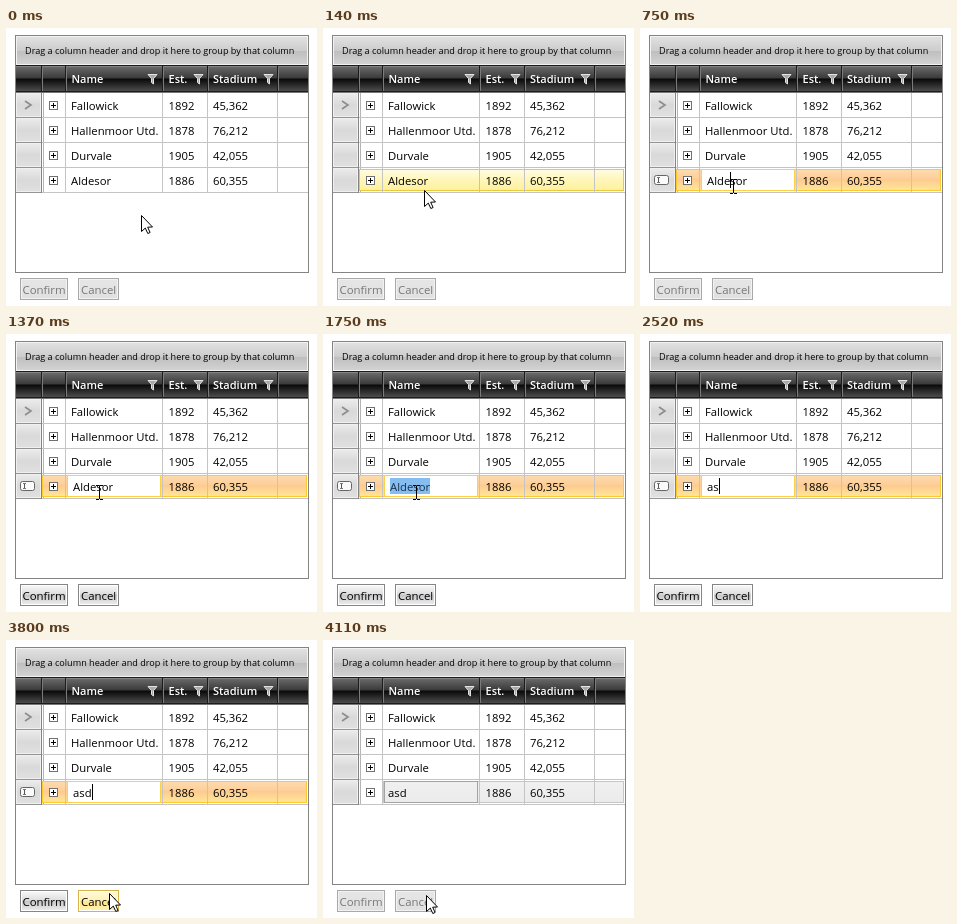
An HTML page with a canvas for the animation above (5160 ms loop, 311 by 278 pixels).

```html
<!DOCTYPE html>
<html lang="en">
<head>
<meta charset="utf-8">
<title>Grid row editing</title>
<style>
html, body { margin: 0; width: 100%; height: 100%; overflow: hidden; background: #fff; }
canvas { display: block; }
</style>
</head>
<body>
<canvas id="stage" width="311" height="278"></canvas>
<script>
const ctx = document.getElementById('stage').getContext('2d');
const LOOP = 5160;
const FONT = '"Open Sans", "Noto Sans", sans-serif';
const COLS = [59, 156, 201, 271];
const ROWS = [
  ['Fallowick', '1892', '45,362'],
  ['Hallenmoor Utd.', '1878', '76,212'],
  ['Durvale', '1905', '42,055'],
  ['Aldesor', '1886', '60,355']
];

// Pointer track: time, x, y, shape
const POINTER = [
  [0, 135, 187, 'arrow'], [80, 118, 174, 'arrow'], [140, 101, 162, 'arrow'],
  [220, 95, 158, 'arrow'], [300, 92, 157, 'arrow'], [750, 93, 158, 'beam'],
  [2210, 0, 0, 'none'], [2890, 93, 158, 'beam'], [2970, 93, 169, 'arrow'],
  [3050, 94, 182, 'arrow'], [3130, 96, 197, 'arrow'], [3210, 97, 209, 'arrow'],
  [3440, 99, 228, 'arrow'], [3520, 100, 236, 'arrow'], [3590, 101, 243, 'arrow'],
  [3660, 102, 249, 'arrow'], [3730, 103, 253, 'arrow'], [3810, 103, 255, 'arrow']
];

function rect(x, y, w, h, fill) {
  ctx.fillStyle = fill;
  ctx.fillRect(x, y, w, h);
}

function frame(x, y, w, h, color) {
  ctx.strokeStyle = color;
  ctx.lineWidth = 1;
  ctx.strokeRect(x + .5, y + .5, w - 1, h - 1);
}

function vgrad(y, h, stops) {
  const g = ctx.createLinearGradient(0, y, 0, y + h);
  stops.forEach(([at, color]) => g.addColorStop(at, color));
  return g;
}

function text(str, x, y, color = '#000', size = 11.3, weight = 400) {
  ctx.font = `${weight} ${size}px ${FONT}`;
  ctx.fillStyle = color;
  ctx.fillText(str, x, y);
}

function poly(points, fill, stroke) {
  ctx.beginPath();
  points.forEach(([x, y]) => ctx.lineTo(x, y));
  ctx.closePath();
  if (fill) { ctx.fillStyle = fill; ctx.fill(); }
  if (stroke) { ctx.strokeStyle = stroke; ctx.lineWidth = 1; ctx.stroke(); }
}

function funnel(x) {
  poly([[x, 46.5], [x + 9, 46.5], [x + 5.5, 50.5], [x + 5.5, 56], [x + 3.5, 54.5], [x + 3.5, 50.5]], '#a8a8a8', '#e4e4e4');
}

function drawHeader() {
  rect(10, 8, 292, 29, vgrad(8, 29, [[0, '#e2e2e2'], [.5, '#cdcdcd'], [.52, '#bebebe'], [1, '#d4d4d4']]));
  frame(10, 8, 292, 29, '#f2f2f2');
  text('Drag a column header and drop it here to group by that column', 19, 26, '#000', 9.1);
  rect(10, 37, 292, 27, '#1c1c1c');
  rect(10, 38, 292, 25, vgrad(38, 25, [[0, '#6c6c6c'], [.48, '#3a3a3a'], [.52, '#090909'], [1, '#4c4c4c']]));
  rect(10, 38, 292, 1, '#858585');
  rect(10, 64, 292, 1, '#777');
  [35, ...COLS].forEach(x => {
    rect(x, 38, 1, 25, '#1c1c1c');
    rect(x + 1, 38, 1, 25, '#7b7b7b');
  });
  [['Name', 65.5, 142], ['Est.', 162.5, 188], ['Stadium', 207, 258]].forEach(([label, x, icon]) => {
    text(label, x, 55, '#fff', 11, 600);
    funnel(icon);
  });
}

function expander(y) {
  rect(43, y + 8, 9, 9, '#fff');
  frame(43, y + 8, 9, 9, '#707070');
  rect(45, y + 12, 5, 1, '#000');
  rect(47, y + 10, 1, 5, '#000');
}

function rowHeader(y) {
  rect(10, y, 25, 24, vgrad(y, 24, [[0, '#ececec'], [.5, '#d9d9d9'], [1, '#e0e0e0']]));
  frame(10, y, 25, 24, '#f0f0f0');
  rect(10, y + 24, 26, 1, '#949494');
  rect(35, y, 1, 25, '#848484');
  rect(37, y, 1, 25, '#b4b4b4');
}

function editIcon() {
  ctx.beginPath();
  ctx.roundRect(14.5, 147.5, 14, 9, 2);
  ctx.fillStyle = '#fafafa';
  ctx.fill();
  ctx.strokeStyle = '#666';
  ctx.lineWidth = 1;
  ctx.stroke();
  rect(18, 149, 1, 6, '#555');
  rect(17, 149, 3, 1, '#777');
  rect(17, 154, 3, 1, '#777');
}

function rowState(t) {
  if (t < 140) return 'idle';
  if (t < 440) return 'hover';
  if (t < 4110) return 'selected';
  return 'current';
}

function fillRow(state) {
  const skins = {
    hover: [[[0, '#fffce6'], [.5, '#fff6b8'], [1, '#fff09a']], '#ecc93c'],
    selected: [[[0, '#fddcae'], [.4, '#fdd09c'], [.48, '#fdcb90'], [1, '#ffe898']], '#ffc92e'],
    current: [[[0, '#f0f0f0'], [1, '#ebebeb']], '#c6c6c6']
  };
  if (!skins[state]) return;
  const [stops, edge] = skins[state];
  const x = state === 'current' ? 60 : 36;
  rect(x, 141, 301 - x, 22, vgrad(141, 22, stops));
  frame(x, 141, 301 - x, 22, edge);
}

function caretOn(t) {
  return t < 1370 || (t >= 2210 && t < 3130) || t >= 3660;
}

function drawEditor(t) {
  rect(61, 141, 94, 22, '#fff');
  frame(61, 141, 94, 22, '#ffcf45');
  const value = t < 2210 ? ROWS[3][0] : t < 2520 ? 'a' : t < 2580 ? 'as' : 'asd';
  const marked = t >= 1750 && t < 2210;
  ctx.font = `11.3px ${FONT}`;
  const width = Math.round(ctx.measureText(value).width);
  if (marked) rect(67, 144, width, 16, '#86bdf0');
  text(value, 67, 157, marked ? '#17324d' : '#000');
  if (caretOn(t) && !marked) rect(t < 2210 ? 90 : 67 + width, 144, 1, 16, '#000');
}

function drawRows(t) {
  const state = rowState(t);
  const editing = t >= 750 && t < 4110;
  ROWS.forEach((cells, i) => {
    const y = 65 + i * 25, last = i === 3;
    rowHeader(y);
    rect(36, y + 24, 266, 1, '#c4c4c4');
    if (last) fillRow(state);
    COLS.forEach(x => rect(x, y, 1, 25, '#c4c4c4'));
    expander(y);
    const name = last && t >= 4110 ? 'asd' : cells[0];
    if (!(last && editing)) text(name, 65, y + 17);
    text(cells[1], 162.5, y + 17);
    text(cells[2], 207, y + 17);
  });
  ctx.beginPath();
  ctx.moveTo(19, 73);
  ctx.lineTo(25, 77);
  ctx.lineTo(19, 81);
  ctx.strokeStyle = '#8c8c8c';
  ctx.lineWidth = 1.6;
  ctx.stroke();
  if (editing) {
    editIcon();
    drawEditor(t);
  }
  if (state === 'current') frame(61, 141, 94, 22, '#a3a3a3');
}

function button(label, x, w, tx, active, hot) {
  const stops = hot ? [[0, '#fffbe0'], [.5, '#fff0b4'], [.52, '#ffe68c'], [1, '#fff3b8']]
    : active ? [[0, '#fcfcfc'], [.46, '#dedede'], [.5, '#c6c6c9'], [1, '#f2f2f2']]
    : [[0, '#e6e6e6'], [1, '#e0e0e0']];
  rect(x, 250, w, 22, vgrad(250, 22, stops));
  frame(x, 250, w, 22, hot ? '#d7b24c' : active ? '#858585' : '#a8a8a8');
  frame(x + 1, 251, w - 2, 20, active ? '#fff' : '#f2f2f2');
  text(label, tx, 266, active ? '#000' : '#777', 11.4);
}

function drawPointer(t) {
  const [, x, y, shape] = POINTER.findLast(p => p[0] <= t);
  if (shape === 'arrow') {
    const tip = [[0, 0], [0, 16], [3.8, 12.6], [6.3, 18], [8.6, 17], [6.2, 11.7], [11, 11.5]];
    poly(tip.map(([a, b]) => [x + a + .5, y + b + .5]), '#fff', '#000');
  } else if (shape === 'beam') {
    rect(x, y - 6, 1, 13, '#000');
    [y - 7, y + 7].forEach(v => {
      rect(x - 3, v, 3, 1, '#000');
      rect(x + 1, v, 3, 1, '#000');
    });
  }
}

function draw(t) {
  rect(0, 0, 311, 278, '#fff');
  drawHeader();
  drawRows(t);
  frame(9, 7, 294, 238, '#848484');
  const active = t >= 890 && t < 4110;
  button('Confirm', 14, 48, 16.5, active, false);
  button('Cancel', 72, 41, 75, active, active && t >= 3730);
  drawPointer(t);
}

function tick() {
  draw(performance.now() % LOOP);
  requestAnimationFrame(tick);
}
tick();
</script>
</body>
</html>
```
